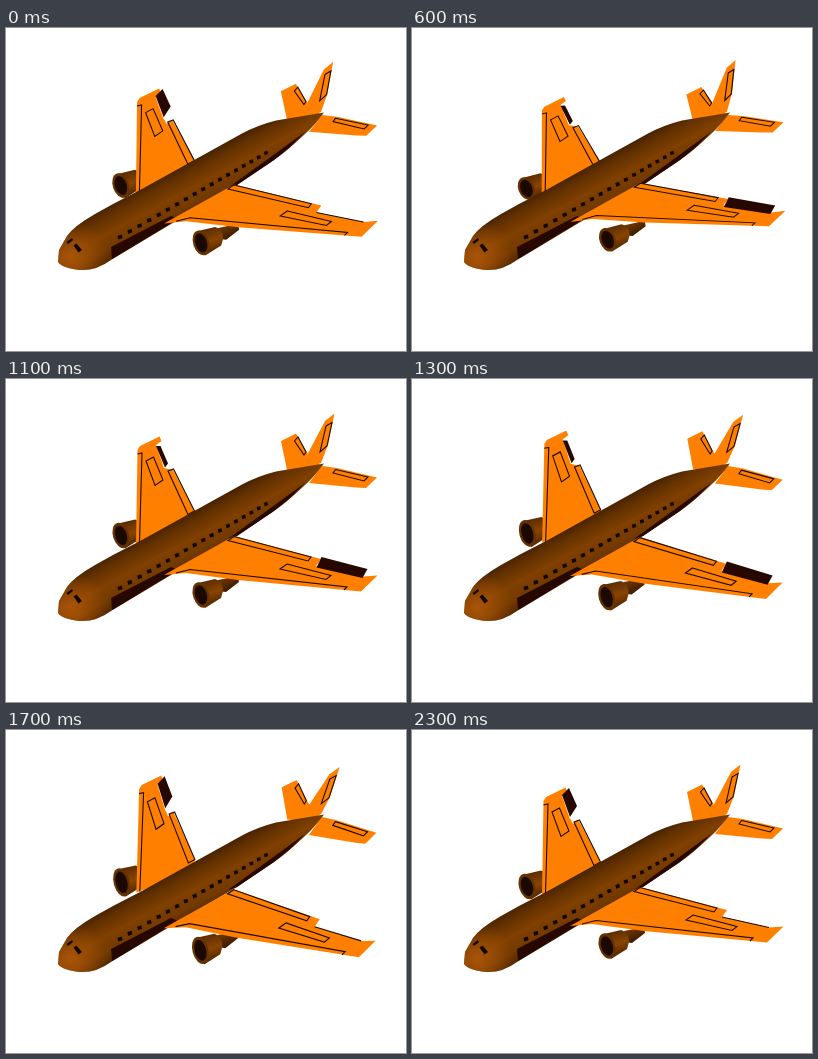
These frames come from a looping animation (400 by 323 pixels, 2400 ms). An HTML page with a canvas:

```html
<!DOCTYPE html>
<html>
<head>
<meta charset="utf-8">
<style>
html, body { margin: 0; width: 100%; height: 100%; overflow: hidden; background: #fff; }
canvas { display: block; }
</style>
</head>
<body>
<canvas id="stage" width="400" height="323"></canvas>
<script>
const ctx = document.getElementById('stage').getContext('2d');
const LOOP = 2400, STEP = 100;
const ORANGE = '#ff8000', BLACK = '#120500', BELLY = '#270800';

function fill(d, color) {
  ctx.fillStyle = color;
  ctx.fill(new Path2D(d));
}

function line(d) {
  ctx.strokeStyle = '#1c0b00';
  ctx.lineWidth = 1.1;
  ctx.stroke(new Path2D(d));
}

function gradient(x0, y0, x1, y1, ...colors) {
  const g = ctx.createLinearGradient(x0, y0, x1, y1);
  colors.forEach((c, i) => g.addColorStop(i / (colors.length - 1), c));
  return g;
}

const skin = gradient(166, 137, 194, 189, '#371a00', '#633100', '#804000', '#723900', '#482200');
const nose = ctx.createRadialGradient(66, 229, 2, 66, 229, 36);
nose.addColorStop(0, 'rgba(172,86,8,.85)');
nose.addColorStop(1, 'rgba(172,86,8,0)');

// Points in the wing plane move in proportion to their distance from the axis.
function rollWings(s) {
  const k = 0.558, c = 262.4, x = 0.014 * s, y = -0.1 * s;
  ctx.setTransform(1 + x * k, y * k, x, 1 + y, -x * c, -y * c);
}

function rollFin(s) {
  const base = 86, x = 0.1 * s, y = 0.05 * s;
  ctx.setTransform(1, 0, x, 1 + y, -x * base, -y * base);
}

function engine(x, y) {
  fill(`M${x - 3} ${y - 12}L${x + 14} ${y - 16}Q${x + 22} ${y - 14} ${x + 22} ${y - 4}L${x + 20} ${y + 3}L${x + 4} ${y + 13}Z`,
    gradient(x + 4, y - 14, x + 13, y + 11, '#5a2c00', '#884400', '#4a2300'));
  for (const [rx, ry, color] of [[8, 13, '#653100'], [5.8, 10, '#1b0900']]) {
    ctx.fillStyle = color;
    ctx.beginPath();
    ctx.ellipse(x, y, rx, ry, -0.3, 0, 7);
    ctx.fill();
  }
}

function farWing(up) {
  fill('M130 165L131.5 71L134 67L153.5 57.5L155.5 62L150 66L158 89L167 91L189 133L178 146Z', ORANGE);
  fill(up ? 'M150 65L157 58L165 76L158 87Z' : 'M150 67L154.5 67L162 84.5L159 88.5Z', BELLY);
  if (up) fill('M158 88L162 83L164.5 90L161 94Z', '#fff');
  line('M140 82L147.5 78L157 101L149 106.5ZM162 92L167.5 90L188.5 132L182 135.5ZM131.5 75L136 74L133.5 164');
}

function nearWing(up) {
  fill('M158 196L228 157L315 180L310 187L357 197.5L371.5 196.5L355 212.5L232 201L180 194Z', ORANGE);
  if (!up) fill('M315.5 178L361.5 190L356.5 199L310.5 188.5Z', BELLY);
  line('M228 157.5L305 178L302 182L222 161.5ZM281 185L325 196.5L320 200.5L274 190ZM170 194L184 190.5L341 208L338 211');
  if (up) line('M310 187L357 197.5');
}

function fuselage() {
  const hull = 'M52 234L53 222L61 208Q68 198 89 186L107 176L135 161.5L236 105.5Q252 97 270 92.5L318 84.5' +
    'Q309 97 299 106Q280 124 268 132L231 157L165 196L105 232Q90 243 74 242Q56 240 52 234Z';
  fill(hull, skin);
  fill(hull, nose);
  fill('M105 219L165 188L172 191L106 231Z', BELLY);
  fill('M222 160L266 128L299 104L284 119L268 132L231 157Z', BELLY);
  fill('M67.5 217.5L70.5 215.5L76 222L72.5 224.5ZM60.5 214L66 210L67 212L62 216Z', BLACK);
  for (let i = 0; i < 18; i++) {
    const x = 114 + 10 * i - 0.083 * i * i;
    const y = 209 - 0.575 * (x - 114), r = 2.6 - i * 0.02;
    fill(`M${x - r} ${y - 1}L${x + r - 1} ${y - r}L${x + r} ${y + 1}L${x - r + 1} ${y + r}Z`, BLACK);
  }
}

function draw(t) {
  const s = Math.sin(2 * Math.PI * (t + 100) / LOOP);
  const up = t < 500 || t >= 1700;

  ctx.setTransform(1, 0, 0, 1, 0, 0);
  ctx.fillStyle = '#fff';
  ctx.fillRect(0, 0, 400, 323);

  rollWings(s);
  engine(115, 156.5);
  farWing(up);
  fill('M275 62L290 54.5L302 75L314 85L300 92L281 91Z', ORANGE);
  line('M288.5 62L292 58L300 73L298 76Z');
  fill('M303 104L316 87L331 89L371 98.5L360 109L350 108.5Z', ORANGE);
  line('M329.5 90.5L362 98L358 102L327 94Z');

  rollFin(s);
  fill('M300 78L319 42L328.5 34.5L322 66L315 84L302 88Z', ORANGE);
  line('M320 47L326 43.5L321 67L314 73Z');

  ctx.setTransform(1, 0, 0, 1, 0, 0);
  fuselage();

  // The engine hangs below the wing plane, so it swings less.
  rollWings(s * 0.7);
  fill('M212 201L232 197L233 203L220 213L212 212Z', gradient(216, 198, 222, 212, '#753a00', '#3c1b00'));
  engine(195, 216);

  rollWings(s);
  nearWing(up);
}

const start = performance.now();
function tick() {
  const t = (performance.now() - start) % LOOP;
  draw(Math.floor(t / STEP) * STEP);
  requestAnimationFrame(tick);
}
tick();
</script>
</body>
</html>
```
